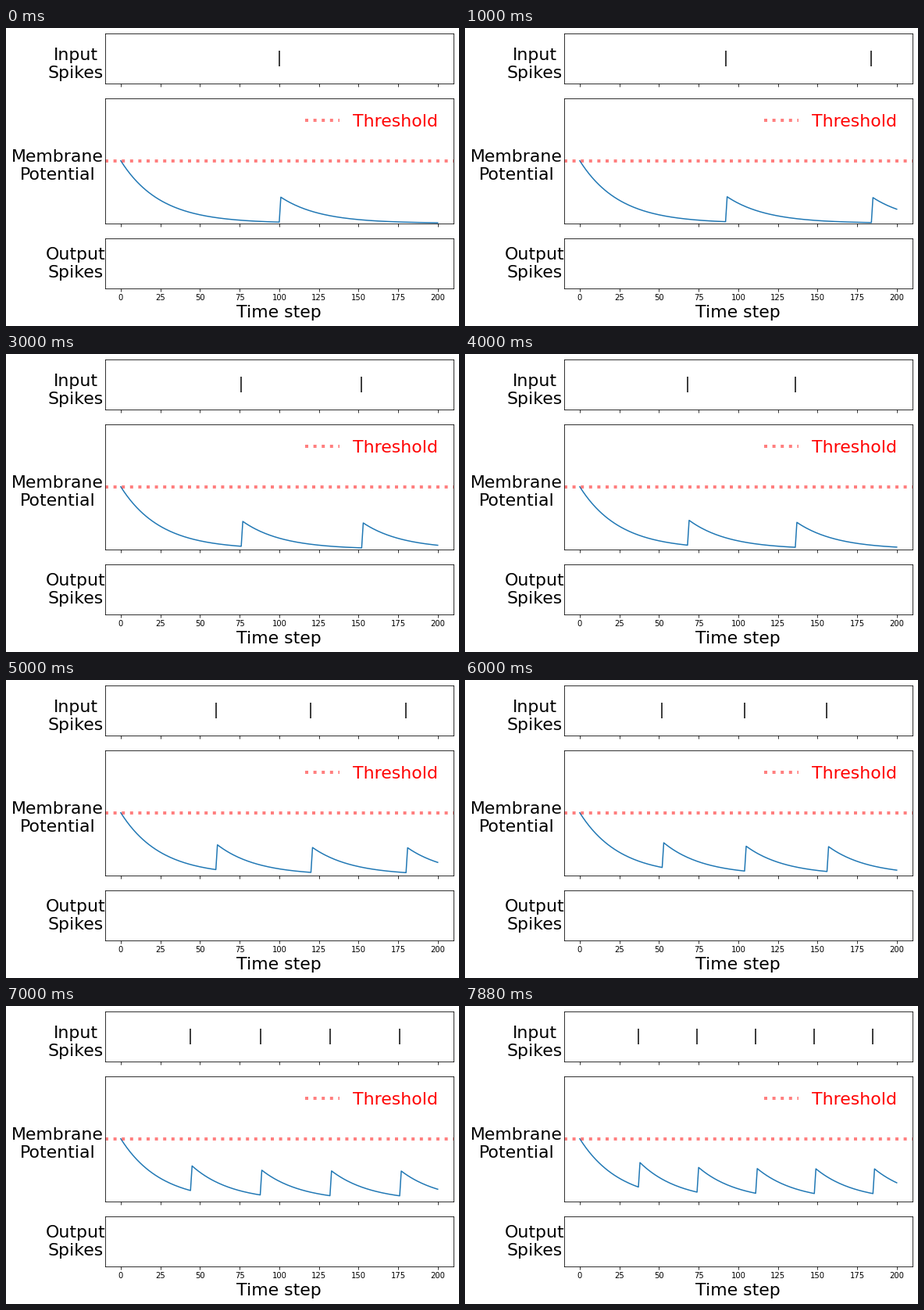
Recreate the animation shown at these times as a matplotlib script. Size 580 by 381 pixels, loop 8000 ms.

```python
import numpy as np
import matplotlib.pyplot as plt
from matplotlib.animation import FuncAnimation

W, H, DPI = 580, 381, 72
FRAMES, INTERVAL = 64, 125
STEPS = 200
THRESHOLD = 0.5
R, C, DT = 5.1, 5e-3, 1e-3
FONT = 22

plt.rcParams["font.family"] = "DejaVu Sans"


def spike_times(frame):
    """Regular input spikes that move closer together by one step per frame."""
    period = 100 - frame
    return np.arange(period, STEPS, period)


def membrane(spikes):
    """Leaky RC neuron driven by unit current pulses (forward Euler)."""
    current = np.zeros(STEPS)
    current[spikes] = 1
    mem = np.empty(STEPS + 1)
    mem[0] = THRESHOLD
    for t in range(STEPS):
        mem[t + 1] = (1 - DT / (R * C)) * mem[t] + current[t] * DT / C
    return mem


fig, axes = plt.subplots(
    3, 1, sharex=True, figsize=(W / DPI, H / DPI), dpi=DPI,
    gridspec_kw=dict(height_ratios=[0.4, 1, 0.4], hspace=0.2,
                     left=126.65 / W, right=573.05 / W,
                     bottom=48.2 / H, top=374.36 / H))
ax_in, ax_mem, ax_out = axes

for ax in axes:
    ax.set_yticks([])
    ax.set_ylim(0, 1)
ax_in.set_xlim(-10, 210)
ax_out.set_xticks(range(0, 201, 25))
ax_out.set_xlabel("Time step", fontsize=FONT)


def side_label(x, baseline, text):
    """Centred two-line label; baseline is that of the lower line."""
    fig.text(x / W, 1 - baseline / H, text, fontsize=FONT,
             ha="center", va="baseline")


side_label(89, 64, "Input\nSpikes")
side_label(66, 194, "Membrane\nPotential")
side_label(89, 319, "Output\nSpikes")

raster, = ax_in.plot([], [], "|", color="black", ms=20, mew=1.5)
curve, = ax_mem.plot([], [], color="C0", lw=1.5)
ax_mem.axhline(THRESHOLD, color="red", alpha=0.5, ls=":", lw=4,
               label="Threshold")
ax_mem.legend(loc="upper right", fontsize=FONT, frameon=False,
              labelcolor="red")


def update(frame):
    spikes = spike_times(frame)
    raster.set_data(spikes, np.full(len(spikes), 0.5))
    curve.set_data(np.arange(STEPS + 1), membrane(spikes))
    return raster, curve


anim = FuncAnimation(fig, update, frames=FRAMES, interval=INTERVAL,
                     repeat=True, repeat_delay=0)
plt.show()
```
